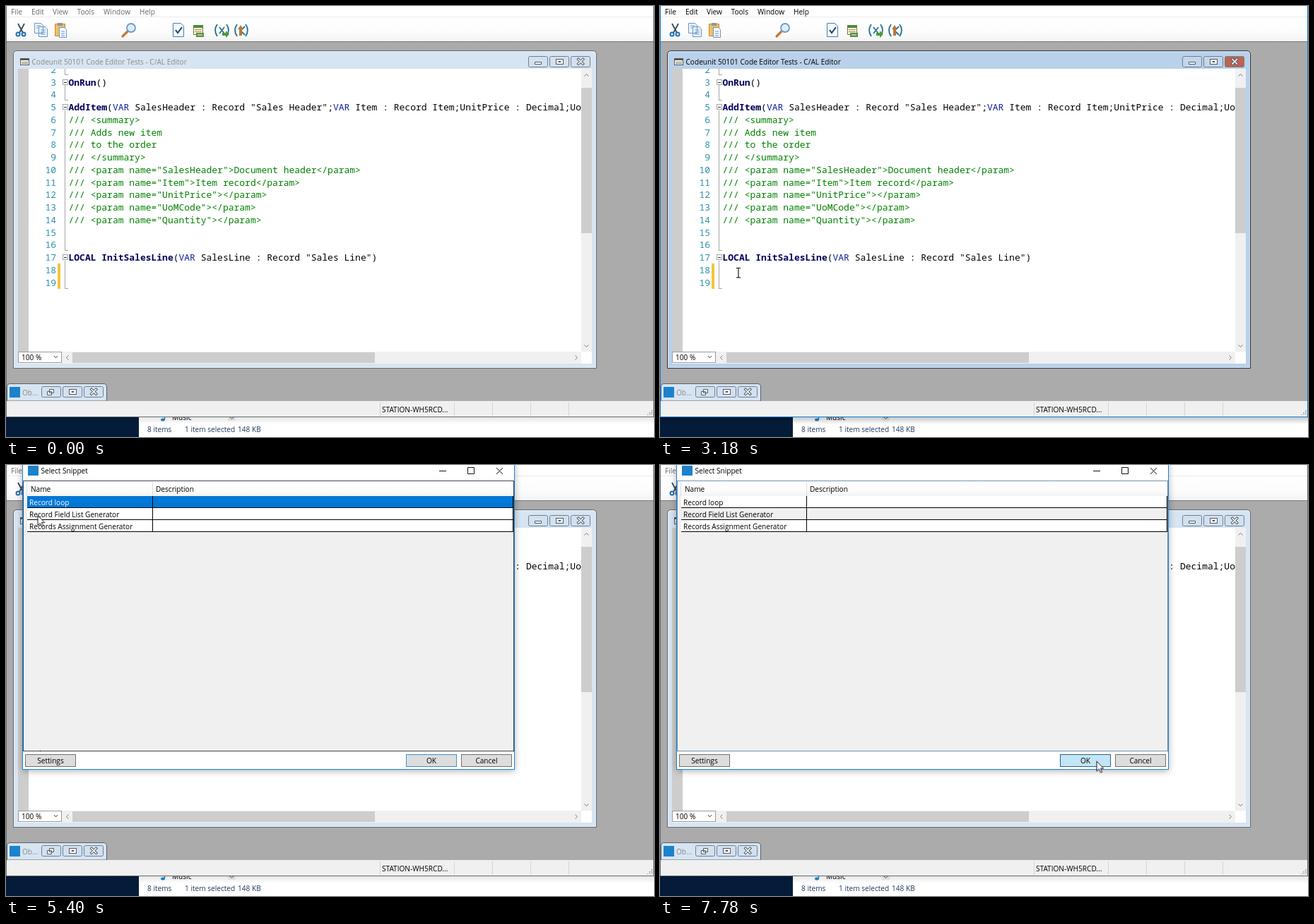
Animation of 917 by 611 pixels, one loop 8 s. Source, as an HTML page:

```html
<!DOCTYPE html>
<html lang="en">
<head>
<meta charset="utf-8">
<title>Code editor snippets</title>
<style>
html, body { margin: 0; width: 100%; height: 100%; overflow: hidden; background: #fff; }
svg { display: block; width: 100%; height: 100%; }
text { font: 10.1px "Open Sans", "Noto Sans", sans-serif; white-space: pre; }
.code text { font: 13px "Noto Sans Mono", "DejaVu Sans Mono", monospace; }
.code .num { fill: #2b91af; text-anchor: end; }
.code .b { font-weight: 700; fill: #00005a; }
.code .k { fill: #10209a; }
.code .c { fill: #008000; }
.mid { text-anchor: middle; }
.line { fill: none; stroke: #a5a5a5; }
.pix { shape-rendering: crispEdges; }

.stage, .caret, .dialog, .grid, .focus, .cell, .ok, .cursor, .arrow, .beam {
  animation-duration: 8s; animation-iteration-count: infinite; animation-timing-function: step-end;
}
.stage { animation-name: focus; }
.caret { animation-name: blink; }
.dialog { animation-name: open; filter: drop-shadow(0 2px 5px rgba(0,0,0,.3)); }
.grid { animation-name: rows; }
.focus { animation-name: first; }
.cell { animation-name: second; }
.ok { animation-name: press; }
.cursor { animation-name: move; }
.arrow { animation-name: arrow; }
.beam { animation-name: beam; }

@keyframes focus {
  0%, 47.625%, 100% { --ink: #6a6a6a; --title: #8b8b8b; --frame: #d7e4f2; --rim: #5d6873; --edge: #666c72; --btn: #d3e0ee; --close: #d3e0ee; --shade: .1; }
  19.625% { --ink: #000; --title: #000; --frame: #b9d1ea; --rim: #26323e; --edge: #0f7fd6; --btn: #c3d6eb; --close: #c26150; --shade: .22; }
}
@keyframes blink {
  0%, 27.125%, 39.75%, 47.625%, 100% { opacity: 0; }
  19.625%, 33%, 46.5% { opacity: 1; }
}
@keyframes open { 0% { opacity: 0; } 47.625%, 100% { opacity: 1; } }
@keyframes rows {
  0% { --r1: #0078d7; --t1: #fff; --r2: #fff; --t2: #000; }
  69.25% { --r1: #fff; --t1: #000; --r2: #0078d7; --t2: #fff; }
  97.25%, 100% { --r1: #fff; --t1: #000; --r2: #f0f0f0; --t2: #000; }
}
@keyframes first { 0% { opacity: 1; } 69.25%, 100% { opacity: 0; } }
@keyframes second { 0%, 97.25%, 100% { opacity: 0; } 69.25% { opacity: 1; } }
@keyframes press {
  0% { fill: #ddd; stroke: #3c8fd0; }
  89.625% { fill: #bee6fd; stroke: #3c7fb1; }
  97.25%, 100% { fill: #c4e5f6; stroke: #2c628b; }
}
@keyframes arrow { 0%, 8.625% { opacity: 0; } 5.625%, 47.625%, 100% { opacity: 1; } }
@keyframes beam { 0%, 47.625%, 100% { opacity: 0; } 8.625% { opacity: 1; } }
@keyframes move {
  0% { transform: translate(629px, 555px); }
  5.625% { transform: translate(629px, 555px); animation-timing-function: steps(5); }
  10.625% { transform: translate(300px, 441px); animation-timing-function: steps(5); }
  15.625% { transform: translate(123px, 380px); animation-timing-function: steps(3); }
  18.625% { transform: translate(110px, 377px); }
  57.25% { transform: translate(110px, 377px); animation-timing-function: steps(3); }
  60.325% { transform: translate(40px, 270px); animation-timing-function: steps(3); }
  63.4% { transform: translate(8px, 150px); animation-timing-function: steps(4); }
  67.5% { transform: translate(44.5px, 71px); }
  75% { transform: translate(43.5px, 70.5px); }
  77.875% { transform: translate(43.5px, 70.5px); animation-timing-function: steps(6); }
  83.875% { transform: translate(329px, 227px); animation-timing-function: steps(5); }
  88.625% { transform: translate(631px, 422px); animation-timing-function: steps(3); }
  92.375% { transform: translate(615px, 416px); }
  93.25% { transform: translate(615px, 416px); animation-timing-function: steps(2); }
  95.25%, 100% { transform: translate(617.5px, 419.5px); }
}
</style>
</head>
<body>
<svg class="stage" viewBox="0 0 917 611">
  <defs>
    <linearGradient id="bar" x2="0" y2="1"><stop stop-color="#fff"/><stop offset=".6" stop-color="#fcfcfc"/><stop offset="1" stop-color="#f3f3f3"/></linearGradient>
    <linearGradient id="shadow" x2="0" y2="1"><stop/><stop offset="1" stop-opacity="0"/></linearGradient>
    <clipPath id="view"><path d="M17 89H814V490H17z"/></clipPath>
    <g id="controls">
      <g fill="var(--btn)" stroke="#6f7f90"><rect x=".5" y=".5" width="27" height="15" rx="2"/><rect x="30.500" y=".5" width="27" height="15" rx="2"/></g>
      <g fill="#fff" stroke="#4e5864"><rect x="39.5" y="4.500" width="10" height="7"/><path d="M43 7.500h3v1h-3z"/></g>
    </g>
    <g id="cross" stroke-linecap="square">
      <path d="M0 0L6.500 6.500M6.500 0L0 6.500" stroke="#4e5864" stroke-width="3.600"/>
      <path d="M0 0L6.500 6.500M6.500 0L0 6.500" stroke="#fff" stroke-width="1.600"/>
    </g>
  </defs>

  <!-- desktop and file list below the window -->
  <rect width="917" height="611" fill="#fff"/>
  <rect y="580" width="188" height="31" fill="#041c3a"/>
  <g fill="#1e395b">
    <text x="235" y="587" fill="#000">Music</text>
    <text x="200" y="604">8 items</text>
    <text x="253" y="604">1 item selected</text>
    <text x="328" y="604">148 KB</text>
  </g>
  <path d="M224.500 580v6" stroke="#1e88d0" stroke-width="1.500"/><ellipse cx="222" cy="586.500" rx="3" ry="2" fill="#1e88d0"/>
  <path d="M314 580h11v8h-11z" fill="#eee"/><path d="M316.500 582.500l3 3 3-3" fill="none" stroke="#555"/>
  <rect y="583" width="917" height="10" fill="url(#shadow)" opacity="var(--shade)" style="opacity:var(--shade)"/>

  <!-- main window -->
  <rect width="917" height="583" fill="#ababab"/>
  <rect width="917" height="16" fill="#fff"/>
  <rect y="16" width="917" height="35" fill="url(#bar)"/>
  <path class="pix" d="M0 15.500H917" stroke="#ececec"/>
  <path class="pix" d="M0 50.500H917" stroke="#777"/>
  <g id="menu" fill="var(--ink)"></g>

  <g id="tools" fill="none">
    <path d="M17 25l7 13M26 25l-7 13" stroke="#34485c" stroke-width="1.800"/>
    <g stroke="#1f6fb5" stroke-width="2"><circle cx="17" cy="40" r="2.500"/><circle cx="25" cy="40" r="2.500"/></g>
    <g fill="#eef5fc" stroke="#6c94bd"><path d="M40.500 24.500h9l3 3v11h-12zM46.500 29.500h9l3 3v11h-12z"/></g>
    <path d="M43 28h6M43 31h4M49 34h7M49 37h7M49 40h7" stroke="#5c9cd5"/>
    <path d="M69.500 25.500h14v17h-14z" fill="#f1bf62" stroke="#c18b30"/><path d="M73 24h7v4h-7z" fill="#8b96a2"/>
    <path d="M75.500 30.500h7l3 3v11h-10z" fill="#f4f8fd" stroke="#6c94bd"/><path d="M78 36h5M78 39h5M78 42h5" stroke="#5c9cd5"/>
    <path d="M172 36l-7 7" stroke="#c87834" stroke-width="3.200" stroke-linecap="round"/>
    <circle cx="177" cy="31" r="6" fill="#dceefb" stroke="#6a9cc9" stroke-width="1.800"/>
    <path d="M236.500 24.500h11l4 4v15h-15z" fill="#f6faff" stroke="#3d7fbd"/><path d="M240 34l3 4 6-8" stroke="#233e62" stroke-width="2"/>
    <path d="M265.500 27.500h13v13h-13z" fill="#fff" stroke="#666d36"/><path d="M265 27h14v4h-14z" fill="#4c8a3b"/>
    <path d="M267 33.500h10M267 36.500h10" stroke="#b59c45" stroke-width="1.500"/><path d="M269 38h11v6h-11z" fill="#5c8f42"/><path d="M271 41h7" stroke="#fff"/>
    <g stroke="#24718f" stroke-width="1.800"><path d="M299 26q-6 8 0 17M312 26q6 8 0 17M302 30l7 9M309 30l-7 9M327 26q-6 8 0 17M339 26q6 8 0 17M331 30v10M338 29l-6 6 6 6"/></g>
    <path d="M306 38h5v-3l5 5-5 5v-3h-5z" fill="#4c9a3f"/><path d="M328 33l4-6 4 6h-2v9h-4v-9z" fill="#b7793c"/>
  </g>

  <!-- editor window -->
  <path d="M10.500 513.500V69q0-5.500 5.500-5.500H830q5.500 0 5.500 5.500V513.500z" fill="var(--frame)" stroke="var(--rim)"/>
  <path d="M11.500 512.500V69q0-4.500 4.500-4.500H830q4.500 0 4.500 4.500V512.500z" fill="none" stroke="#fff" opacity=".55"/>
  <g class="pix"><path d="M20.500 74.500h12v9h-12z" fill="#fff" stroke="#555"/><path d="M20 75.500h13" stroke="#555" stroke-width="2"/><path d="M22 79.500h9M22 81.500h9" stroke="#8a7b50"/></g>
  <text x="36.500" y="83" fill="var(--title)">Codeunit 50101 Code Editor Tests - C/AL Editor</text>
  <use href="#controls" x="739" y="71"/>
  <rect x="799.500" y="71.500" width="27" height="15" rx="2" fill="var(--close)" stroke="#6f7f90"/>
  <path d="M748.500 79.500h9v3h-9z" fill="#fff" stroke="#4e5864"/>
  <use href="#cross" x="810" y="75.500"/>

  <rect x="17" y="89" width="812" height="418" fill="#fff"/>
  <rect x="17" y="89" width="15" height="401" fill="#cdcdcd"/>
  <g class="code" clip-path="url(#view)">
    <g id="lines"></g>
    <path class="line pix" d="M83.500 89V97.500H88M83.500 112V133.500H88M83.500 148V346.500H88M83.500 361V400.500H88"/>
    <g id="folds" class="pix"></g>
    <rect x="73" y="365" width="4" height="36" fill="#f3c63c"/>
    <rect class="caret" x="89" y="365" width="1" height="17"/>
  </g>

  <g fill="#f0f0f0"><rect x="814" y="89" width="15" height="401"/><rect x="79" y="490" width="735" height="17"/></g>
  <g fill="#cdcdcd"><rect x="814" y="116" width="15" height="206"/><rect x="94" y="491" width="428" height="15"/></g>
  <g fill="none" stroke="#777"><path d="M818.500 99.500l3-3 3 3M818.500 480.500l3 3 3-3M88.500 495.500l-3 3 3 3M805.500 495.500l3 3-3 3"/></g>
  <path class="pix" d="M17.500 490.500h61v15h-61z" fill="#fff" stroke="#9a9a9a"/>
  <text x="22" y="502">100 %</text><path d="M68 496l2.500 3 2.500-3" fill="none" stroke="#444"/>

  <!-- minimised window -->
  <path d="M1.500 560V540q0-4.500 4.500-4.500H138q4.500 0 4.500 4.500V560z" fill="#d7e4f2" stroke="#56616c"/>
  <rect x="5" y="540" width="15" height="15" fill="#1c82cc"/>
  <text x="23" y="552" fill="#8b8b8b">Ob...</text>
  <g style="--btn:#d3e0ee">
    <use href="#controls" x="50" y="539"/>
    <rect x="110.500" y="539.500" width="27" height="15" rx="2" fill="var(--btn)" stroke="#6f7f90"/>
    <g fill="#fff" stroke="#4e5864"><path d="M61.500 543.500h6v5h-6zM58.500 546.500h6v5h-6z"/></g>
    <use href="#cross" x="121" y="543.500"/>
  </g>

  <!-- status bar -->
  <rect y="560" width="917" height="22" fill="#f0f0f0"/>
  <path class="pix" d="M529.500 562v19M634.500 562v19M688.500 562v19M742.500 562v19M796.500 562v19" stroke="#d5d5d5"/>
  <text x="532" y="576">STATION-WH5RCD...</text>
  <path d="M914 573v7M911 576v4M908 579v1" stroke="#b0b0b0" stroke-width="2" stroke-dasharray="2 1"/>
  <path class="pix" d="M.5 0V582.500H916.500V0" fill="none" stroke="var(--edge)"/>

  <!-- snippet dialog -->
  <g class="dialog">
    <rect x="23.500" y="-5.500" width="696" height="437" fill="#fff" stroke="#1883d7"/>
    <rect x="31" y="1" width="15" height="14" fill="#1c82cc"/>
    <text x="49.500" y="12">Select Snippet</text>
    <path d="M613 8.500h10M653.500 3.500h9v9h-9zM694 4l9 9M703 4l-9 9" fill="none" stroke="#111"/>
    <g class="grid">
      <path class="pix" d="M24.500 22.500h694v383h-694z" fill="#f0f0f0" stroke="#7890a8"/>
      <rect x="25" y="23" width="693" height="21" fill="url(#bar)"/>
      <path class="pix" d="M207.500 24v20M29.500 24v20" stroke="#dcdcdc"/>
      <text x="35" y="38">Name</text><text x="212" y="38">Description</text>
      <g class="pix">
        <rect x="30" y="44" width="688" height="17" fill="var(--r1)"/>
        <rect x="30" y="61" width="688" height="17" fill="var(--r2)"/>
        <rect x="30" y="78" width="688" height="17" fill="#fff"/>
        <path d="M30 60.500h688M30 77.500h688M30 94.500h688M207.500 44v51M717.500 44v51" stroke="#000"/>
        <path class="cell" d="M31 62h175v15h-175z" fill="none" stroke="#000" stroke-width="2"/>
        <path class="focus" d="M24.500 22.500h694v383h-694z" fill="none" stroke="#000" stroke-dasharray="1 1"/>
      </g>
      <text x="33" y="57" fill="var(--t1)">Record loop</text>
      <text x="33" y="74" fill="var(--t2)">Record Field List Generator</text>
      <text x="33" y="91">Records Assignment Generator</text>
    </g>
    <g class="pix" fill="#ddd" stroke="#707070">
      <rect x="27.500" y="410.500" width="71" height="17"/>
      <rect class="ok" x="566.500" y="410.500" width="71" height="17"/>
      <rect x="644.500" y="410.500" width="71" height="17"/>
    </g>
    <g class="mid"><text x="63" y="423">Settings</text><text x="602" y="423">OK</text><text x="680" y="423">Cancel</text></g>
  </g>

  <g class="cursor">
    <path class="arrow" d="M.5 .5V14.500L3.700 11.500 6 16.500 8.200 15.500 6 10.700H10.300z" fill="#fff" stroke="#000" stroke-width=".9"/>
    <path class="beam" d="M-2 -5.500H.5L1 -5 1.500 -5.500H4M1 -5V7.500M-2 8H.5L1 7.500 1.500 8H4" fill="none" stroke="#000" stroke-width="1.100"/>
  </g>
</svg>
<script>
const $ = id => document.getElementById(id);
const esc = s => s.replace(/</g, "&lt;").replace(/>/g, "&gt;");
const span = cls => s => `<tspan class="${cls}">${esc(s)}</tspan>`;
const bold = span("b"), key = span("k"), note = s => span("c")("/// " + s);
const param = (name, text = "") => note(`<param name="${name}">${text}</param>`);
const pitch = 17.75, firstLine = 2;

const lines = [
  "",
  bold("OnRun") + "()",
  "",
  bold("AddItem") + "(" + key("VAR") + ' SalesHeader : Record "Sales Header";' + key("VAR") +
    " Item : Record Item;UnitPrice : Decimal;UoMCode",
  note("<summary>"),
  note("Adds new item"),
  note("to the order"),
  note("</summary>"),
  param("SalesHeader", "Document header"),
  param("Item", "Item record"),
  param("UnitPrice"),
  param("UoMCode"),
  param("Quantity"),
  "",
  "",
  bold("LOCAL InitSalesLine") + "(" + key("VAR") + ' SalesLine : Record "Sales Line")',
  "",
  ""
];

$("lines").innerHTML = lines.map((line, i) => {
  const y = Math.round(94.75 + i * pitch);
  return `<text class="num" x="71" y="${y}">${i + firstLine}</text><text x="88.500" y="${y}">${line}</text>`;
}).join("");

$("folds").innerHTML = [108, 143, 356].map(y =>
  `<path d="M80.500 ${y - 3.5}h7v7h-7z" fill="#fff" stroke="#a5a5a5"/><path d="M82 ${y + .5}h4" stroke="#333"/>`
).join("");

const menu = { File: 7, Edit: 36, View: 66, Tools: 100.5, Window: 138, Help: 189 };
$("menu").innerHTML = Object.entries(menu).map(([name, x]) => `<text x="${x}" y="11.500">${name}</text>`).join("");
</script>
</body>
</html>
```
